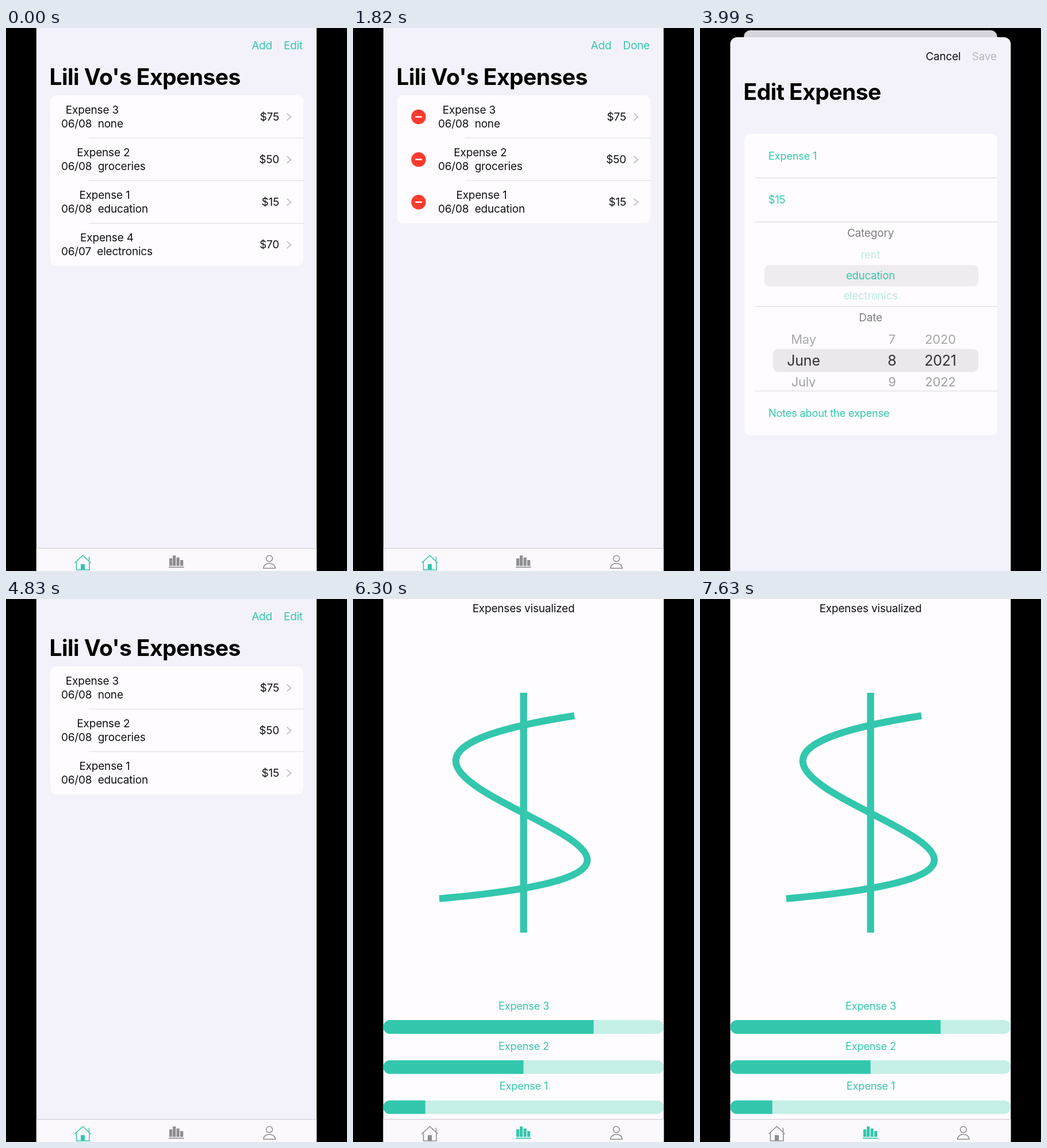
Animation, 593 px wide and 944 px high, one loop 7700 ms. Source, as an HTML page with a canvas:

```html
<!DOCTYPE html>
<html lang="en">
<head>
<meta charset="utf-8">
<title>Expenses</title>
<style>
html, body { margin: 0; width: 100%; height: 100%; overflow: hidden; background: #000; }
canvas { display: block; }
</style>
</head>
<body>
<canvas id="stage" width="593" height="944"></canvas>
<script>
const ctx = document.getElementById('stage').getContext('2d');
const LOOP = 7700, LEFT = 52.6, WIDTH = 487.8, MID = 296.5, ROW = 74.15;
const TEAL = '#33c7ad', INK = '#111113', PAGE = '#f3f2fb', CELL = '#fefcff', LINE = '#dddbe1', GREY = '#8e8d92';
const expenses = [
  ['Expense 3', '06/08  none', 75],
  ['Expense 2', '06/08  groceries', 50],
  ['Expense 1', '06/08  education', 15],
  ['Expense 4', '06/07  electronics', 70]
];

// Eased progress from 0 to 1 between two times
function ease(t, from, to) {
  const p = Math.min(1, Math.max(0, (t - from) / (to - from)));
  return 1 - (1 - p) ** 3;
}

function font(size, weight = 400, spacing = -0.2) {
  ctx.font = `${weight} ${size}px Inter, "Liberation Sans", sans-serif`;
  ctx.letterSpacing = spacing + 'px';
}

function text(str, x, y, color = INK, size = 19, align = 'left') {
  font(size);
  ctx.textAlign = align;
  ctx.fillStyle = color;
  ctx.fillText(str, x, y);
}

function heading(str, y) {
  font(39, 700, -0.55);
  ctx.textAlign = 'left';
  ctx.fillStyle = '#000';
  ctx.fillText(str, 75.5, y);
}

function rect(x, y, w, h, color, radius = 0) {
  ctx.fillStyle = color;
  ctx.beginPath();
  ctx.roundRect(x, y, w, h, radius);
  ctx.fill();
}

function stroke(path, color, width) {
  ctx.strokeStyle = color;
  ctx.lineWidth = width;
  ctx.stroke(new Path2D(path));
}

// Runs draw with its own alpha and transform state
function layer(alpha, draw) {
  if (alpha <= 0) return;
  ctx.save();
  ctx.globalAlpha *= alpha;
  draw();
  ctx.restore();
}

function tabBar(active) {
  const color = i => i === active ? TEAL : GREY;
  rect(LEFT, 904, WIDTH, 40, '#fbf9fd');
  rect(LEFT, 904, WIDTH, 1.3, '#d2d0d6');
  stroke('M119.5 930L133.5 917L147.5 930M122.5 928V942H145V928M144.5 926V919.5', color(0), 1.6);
  rect(130, 932, 7, 10, color(0));
  [[284, 922], [290, 917], [296.5, 920.5], [303, 925]].forEach(([x, y]) => rect(x, y, 5.2, 935 - y, color(1)));
  rect(283, 936.5, 26.5, 1.8, color(1));
  stroke('M463.4 922.3A5.4 5.4 0 1 1 452.6 922.3A5.4 5.4 0 1 1 463.4 922.3M447.8 939.3C447.8 927.8 468.2 927.8 468.2 939.3Z', color(2), 1.5);
}

function row([name, detail, price], i, edit) {
  const x = 96 + 52 * edit, y = 117 + ROW * i;
  layer(edit, () => {
    const cx = 114 - 30 * (1 - edit);
    rect(cx - 12.7, y + 24.8, 25.4, 25.4, '#fd3a30', 12.7);
    rect(cx - 6.2, y + 36.2, 12.4, 2.5, '#fff', 1);
  });
  font(19);
  const center = x + ctx.measureText(detail).width / 2;
  text(name, center, y + 32, INK, 19, 'center');
  text(detail, x, y + 56);
  text('$' + price, 475, y + 44, INK, 19, 'right');
  stroke(`M488.5 ${y + 31.5}L495.5 ${y + 37.5}L488.5 ${y + 43.5}`, '#c4c3c8', 2);
}

function navButtons(label, alpha, divider) {
  layer(alpha, () => {
    font(19);
    const x = 516 - ctx.measureText(label).width;
    text(label, 516, 37, TEAL, 19, 'right');
    text('Add', x - 20, 37, TEAL, 19, 'right');
    if (divider) rect(x - 10, 19, 1, 23, '#e6e4ec');
  });
}

function list(t) {
  const edit = ease(t, 420, 760) - ease(t, 4530, 4800);
  const gone = ease(t, 1330, 1680);
  const height = ROW * (4 - gone);
  rect(LEFT, 0, WIDTH, 944, PAGE);
  navButtons('Edit', 1 - edit, t < 4500);
  navButtons('Done', edit, true);
  heading("Lili Vo's Expenses", 99);
  rect(77, 117, 440, height, CELL, 10);
  ctx.save();
  ctx.beginPath();
  ctx.rect(77, 117, 440, height);
  ctx.clip();
  expenses.forEach((item, i) => {
    layer(i === 3 ? 1 - gone : 1, () => {
      if (i) rect(144 + 51 * edit, 116.5 + ROW * i, 373 - 51 * edit, 1, LINE);
      if (i === 3) ctx.translate(-440 * gone, 0);
      row(item, i, edit);
    });
  });
  ctx.restore();
  tabBar(0);
}

function wheelRow(y, size, color, cells) {
  [180, 334, 418].forEach((x, i) => text(cells[i], x, y, color, size, 'center'));
}

function editSheet(t) {
  rect(LEFT, 16, WIDTH, 960, PAGE, 12);
  text('Cancel', 453.5, 56, INK, 19, 'right');
  text('Save', 516, 56, t > 3880 ? '#bbb9c0' : INK, 19, 'right');
  rect(463, 40, 1, 20, '#eae8f0');
  heading('Edit Expense', 125);
  rect(77, 184, 440, 524, CELL, 10);
  [260, 336.5, 483.5, 630.5].forEach(y => rect(96, y, 421, 1.2, LINE));
  text('Expense 1', 119, 229, TEAL, 18.2);
  text('$15', 119, 305, TEAL, 18.2);
  text('Notes about the expense', 119, 676, TEAL, 18.2);

  text('Category', MID, 363, '#7e7d82', 19, 'center');
  rect(112, 412, 372, 37, '#eeecef', 9);
  text('rent', MID, 401, '#b9ebe2', 18.5, 'center');
  text('education', MID, 436.5, TEAL, 18.5, 'center');
  text('electronics', MID, 472, '#b9ebe2', 18.5, 'center');

  text('Date', MID, 510, '#7e7d82', 19, 'center');
  rect(127, 558, 357, 40, '#eae8eb', 9);
  wheelRow(548.5, 22, '#a9a8ad', ['May', '7', '2020']);
  wheelRow(587, 25, '#333236', ['June', '8', '2021']);
  ctx.save();
  ctx.beginPath();
  ctx.rect(96, 599, 421, 25);
  ctx.clip();
  wheelRow(622.5, 22, '#a0a0a4', ['July', '9', '2022']);
  ctx.restore();
}

function home(t) {
  const up = ease(t, 1850, 2420) - ease(t, 4020, 4480);
  ctx.save();
  ctx.translate(MID, 4 * up);
  ctx.scale(1 - 0.0965 * up, 1 - 0.0965 * up);
  ctx.translate(-MID, 0);
  ctx.beginPath();
  ctx.roundRect(LEFT, 0, WIDTH, 960, 13 * up);
  ctx.clip();
  list(t);
  rect(LEFT, 0, WIDTH, 960, `rgba(0,0,0,${0.12 * up})`);
  ctx.restore();
  if (up > 0) {
    ctx.save();
    ctx.translate(0, 928 * (1 - up));
    editSheet(t);
    ctx.restore();
  }
}

function chart() {
  rect(LEFT, 0, WIDTH, 944, CELL);
  text('Expenses visualized', MID, 23, INK, 19, 'center');
  stroke('M385 203C-262 303 888 455 150 521', TEAL, 12);
  rect(290.5, 163, 12.3, 417, TEAL);
  expenses.slice(0, 3).forEach(([name, , price], i) => {
    const y = 732 + 69.7 * i;
    text(name, 297, y - 18, TEAL, 18.2, 'center');
    ctx.save();
    ctx.beginPath();
    ctx.roundRect(LEFT, y, WIDTH, 24, 12);
    ctx.clip();
    rect(LEFT, y, WIDTH, 24, '#c5efe7');
    rect(LEFT, y, WIDTH * price / 100, 24, TEAL);
    ctx.restore();
  });
  tabBar(1);
}

function frame(now) {
  const t = now % LOOP;
  rect(0, 0, 593, 944, '#000');
  if (t < 5250) home(t);
  else chart();
  requestAnimationFrame(frame);
}
requestAnimationFrame(frame);
</script>
</body>
</html>
```
